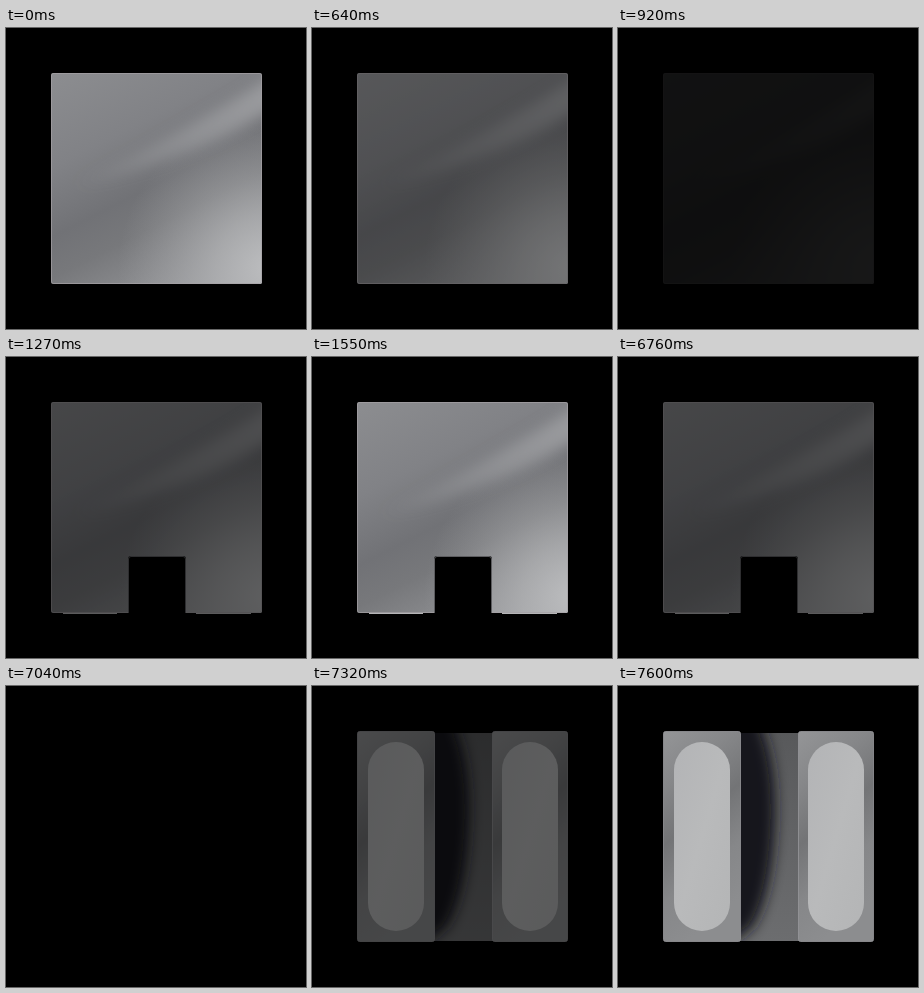
Animation of 300 by 301 pixels, one loop 8000 ms. Source, as an HTML page:

```html
<!DOCTYPE html>
<html lang="en">
<head>
<meta charset="utf-8">
<title>Metal cube faces</title>
<style>
  html, body { margin: 0; width: 100%; height: 100%; overflow: hidden; background: #000; }
  svg { display: block; width: 100vw; height: 100vh; }
  .face { opacity: 0; }
</style>
</head>
<body>
<svg viewBox="0 0 300 301">
  <defs>
    <linearGradient id="metal" gradientUnits="userSpaceOnUse" x1="46" y1="45" x2="173" y2="296">
      <stop offset="0" stop-color="#8c8d90"/>
      <stop offset=".3" stop-color="#818286"/>
      <stop offset=".52" stop-color="#717276"/>
      <stop offset=".65" stop-color="#77787b"/>
      <stop offset="1" stop-color="#a0a1a4"/>
    </linearGradient>
    <radialGradient id="glow" gradientUnits="userSpaceOnUse" cx="262" cy="240" r="150">
      <stop offset="0" stop-color="#bcbdbf"/>
      <stop offset=".35" stop-color="#b3b4b6" stop-opacity=".7"/>
      <stop offset="1" stop-color="#a0a1a4" stop-opacity="0"/>
    </radialGradient>
    <linearGradient id="streak">
      <stop offset="0" stop-color="#a2a3a6" stop-opacity=".1"/>
      <stop offset=".6" stop-color="#a2a3a6" stop-opacity=".6"/>
      <stop offset="1" stop-color="#a2a3a6" stop-opacity=".85"/>
    </linearGradient>
    <linearGradient id="panel" x1="0" y1="0" x2=".3" y2="1">
      <stop offset="0" stop-color="#949597"/>
      <stop offset=".25" stop-color="#868789"/>
      <stop offset=".5" stop-color="#737476"/>
      <stop offset=".75" stop-color="#868789"/>
      <stop offset="1" stop-color="#8c8d8f"/>
    </linearGradient>
    <linearGradient id="pad" x1="0" y1="0" x2="1" y2="1">
      <stop offset="0" stop-color="#b3b4b6"/>
      <stop offset=".5" stop-color="#b9babb"/>
      <stop offset="1" stop-color="#b4b5b6"/>
    </linearGradient>
    <linearGradient id="recess" x1="0" y1="0" x2="0" y2="1">
      <stop offset="0" stop-color="#58595b"/>
      <stop offset=".5" stop-color="#626365"/>
      <stop offset="1" stop-color="#6c6d6f"/>
    </linearGradient>
    <filter id="blur" x="-50%" y="-50%" width="200%" height="200%">
      <feGaussianBlur stdDeviation="7"/>
    </filter>
    <clipPath id="square"><rect x="45" y="45" width="211" height="211" rx="2"/></clipPath>
    <clipPath id="slot"><path d="M122 47H181V255H122Z"/></clipPath>
    <g id="sheet" clip-path="url(#square)">
      <path fill="url(#metal)" d="M45 45H256V256H45Z"/>
      <path fill="url(#glow)" d="M45 45H256V256H45Z"/>
      <path fill="url(#streak)" filter="url(#blur)" d="M70 158Q175 105 280 40V72Q200 128 70 158Z"/>
      <rect x="45.5" y="45.5" width="210" height="210" rx="2" fill="none" stroke="#a5a2a5" stroke-opacity=".7"/>
    </g>
  </defs>
  <rect width="300" height="301"/>

  <g class="face"><use href="#sheet"/></g>

  <g class="face">
    <use href="#sheet"/>
    <path d="M122 258V202Q122 199 125 199H177Q180 199 180 202V258Z"/>
    <path d="M122.5 256V202Q122.5 199.5 125 199.5H177Q179.5 199.5 179.5 202V256"
          fill="none" stroke="#5d5d60"/>
    <path d="M57 256.5H111M190 256.5H245" stroke="#b5b5b7"/>
  </g>

  <g class="face">
    <g clip-path="url(#slot)">
      <path d="M122 47H181V255H122Z" fill="url(#recess)"/>
      <path d="M105 30H138Q160 70 157 140T134 242L105 262Z" fill="#19191b" filter="url(#blur)"/>
    </g>
    <g fill="url(#panel)" stroke="#98989b" stroke-opacity=".8">
      <rect x="45.5" y="45.5" width="77" height="210" rx="2"/>
      <rect x="180.5" y="45.5" width="75" height="210" rx="2"/>
    </g>
    <g fill="url(#pad)">
      <rect x="56" y="56" width="56" height="189" rx="28"/>
      <rect x="190" y="56" width="56" height="189" rx="28"/>
    </g>
  </g>
</svg>
<script>
  const LOOP = 8000, STEP = 70, FADE = 8;
  const starts = [500, 6550];
  const faces = document.querySelectorAll('.face');

  // Each change fades to black in eight steps, then back up in eight.
  function pose(t) {
    let face = 0, level = 1;
    starts.forEach((start, i) => {
      if (t < start) return;
      const n = Math.min(Math.floor((t - start) / STEP) + 1, 2 * FADE);
      face = n > FADE ? i + 1 : i;
      level = Math.abs(n - FADE) / FADE;
    });
    return { face, level };
  }

  const origin = performance.now();
  function draw() {
    const { face, level } = pose((performance.now() - origin) % LOOP);
    faces.forEach((el, i) => el.style.opacity = i === face ? level : 0);
    requestAnimationFrame(draw);
  }
  draw();
</script>
</body>
</html>
```
